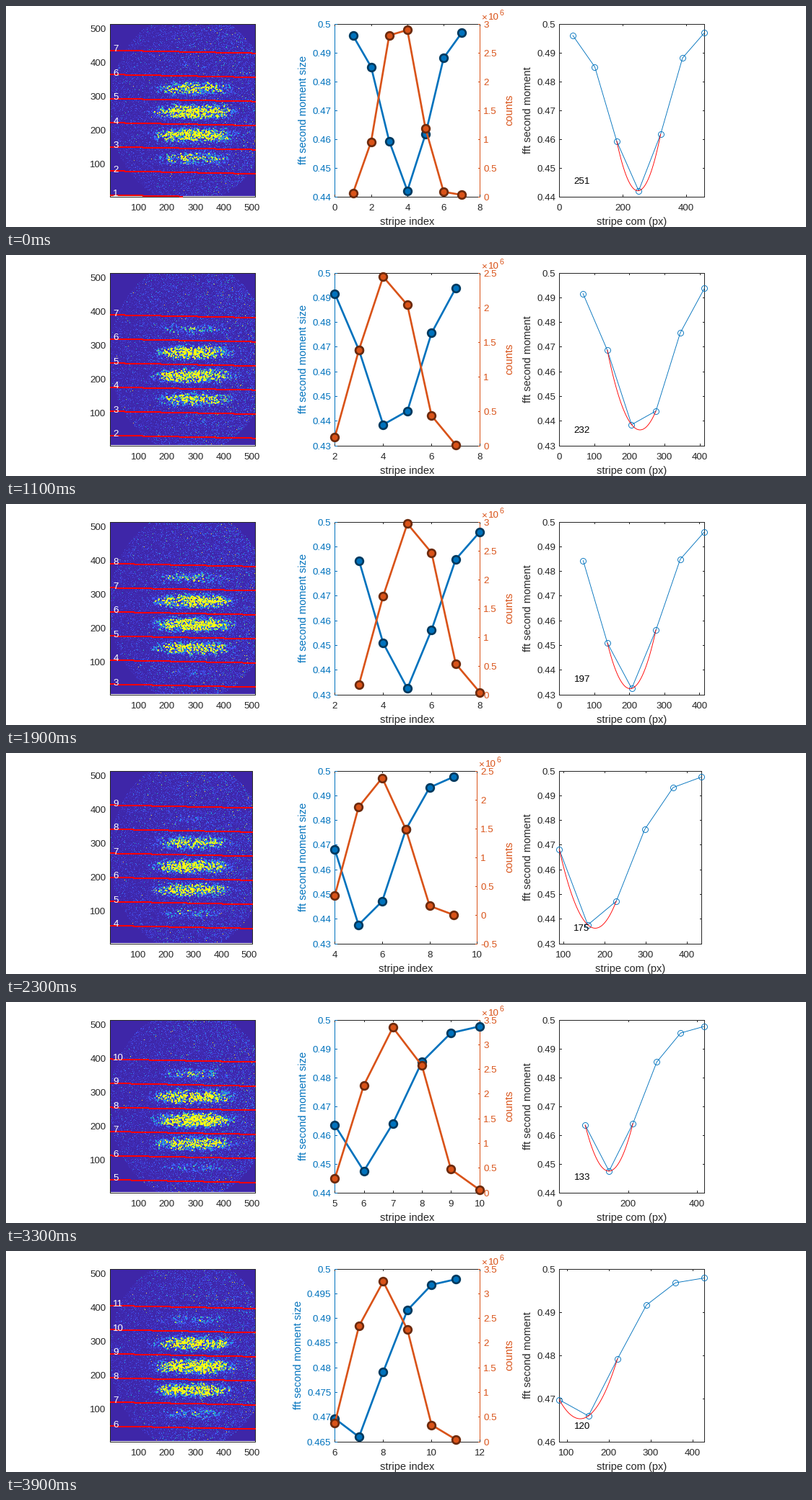
Animation, 1108 px wide and 307 px high, one loop 4.4 s. Source, as a matplotlib script:

```python
import numpy as np
import matplotlib.pyplot as plt
from matplotlib.animation import FuncAnimation
from matplotlib.colors import LinearSegmentedColormap

W, H, DPI = 1108, 307, 64
PT = 72 / DPI                      # points per pixel
TOP, BOTTOM = 24, 264
DARK, BLUE, ORANGE = "#262626", "#0072BD", "#D95319"
PITCH, ROW_SCALE = 33.5, 240 / 512
STRIPES = np.arange(1, 13)
PARULA = LinearSegmentedColormap.from_list("parula_like", [
    "#3E26A8", "#4746EB", "#3E6FFF", "#2797EB", "#0FB4CF",
    "#38C896", "#9FC941", "#FEC338", "#F9FB15"])

# Key points of the drift: height of line 1, centre and depth of the dip
STEPS = [0, 4, 8, 10, 13, 16, 18]
BASE = [262, 283.5, 316.75, 339.75, 364, 388.5, 410.25]
CENTRE = [251, 232, 197, 175, 136, 131, 120]
DIP = [.442, .435, .432, .436, .437, .452, .464]
# Brightness of the camera image at each step
EXPOSURE = [2.97, 3.7, 3.7, 3.7, 2.45, 3.7, 2.7, 3.7, 2.95, 3.7,
            2.38, 2.6, 2.9, 3.72, 3.3, 3.3, 3.75, 3.7, 3.2]

fig = plt.figure(figsize=(W / DPI, H / DPI), dpi=DPI, facecolor="white")
ax = fig.add_axes([0, 0, 1, 1])


def measure(step):
    """Position, moment and counts of the stripes in view at one step."""
    base, centre, dip = (np.interp(step, STEPS, v) for v in (BASE, CENTRE, DIP))
    middle = base - PITCH * (STRIPES - .5) + 1.75
    coms = 250 + .97 * ((BOTTOM - middle) / ROW_SCALE - 250)
    shown = (coms > 30) & (coms < 465)
    coms = coms[shown]

    offset = coms - centre
    spread = np.where(offset < 0, 115 - 1.5 * step, 105 + 1.5 * step)
    moments = .498 - (.498 - dip) * np.exp(-(offset / spread) ** 2)

    exposure = EXPOSURE[step]
    counts = exposure * np.exp(-np.abs((coms - 220) / 102) ** 2.75) + .05 * (exposure - 2.42)
    return STRIPES[shown], coms, moments, counts, base, centre


def text(x, y, s, color=DARK, size=13.33, ha="left", **kw):
    kw.setdefault("va", "baseline")
    ax.text(x, y, s, color=color, fontsize=size * PT, ha=ha,
            family="Liberation Sans", **kw)


def label(x, y, s, color=DARK, **kw):
    text(x, y, s, color, 14.67, "center", **kw)


def side_label(x, s, color=DARK):
    label(x, 144, s, color, va="center", rotation=90)


def line(x, y, color=DARK, width=1, **kw):
    ax.plot(x, y, color=color, lw=width * PT, **kw)


def scale(limits, start, end):
    lo, hi = limits
    return lambda v: start + (np.asarray(v) - lo) / (hi - lo) * (end - start)


def ticks(limits, step):
    lo, hi = limits
    return np.arange(np.ceil(lo / step - 1e-6), np.floor(hi / step + 1e-6) + 1) * step


def frame_box(left, right, left_color=DARK, right_color=DARK):
    for y in (TOP, BOTTOM):
        line([left, right], [y, y])
    line([left, left], [TOP, BOTTOM], left_color)
    line([right, right], [TOP, BOTTOM], right_color)


def x_ticks(values, to_x, marks=True):
    for v in values:
        x = float(to_x(v))
        text(x, 283.5, f"{v + 0:g}", ha="center")
        if marks:
            line([x, x], [BOTTOM, BOTTOM - 2.4])
            line([x, x], [TOP, TOP + 2.4])


def y_ticks(values, to_y, x, side, color=DARK, labels=True):
    for v in values:
        y = float(to_y(v))
        line([x, x - side * 2.4], [y, y], color)
        if labels:
            text(x + 5 * side, y + 5, f"{v + 0:g}", color, ha="left" if side > 0 else "right")


def moment_limits(lowest, step):
    return np.floor(lowest / step + 1e-6) * step, .5


def draw_camera(step, width, shown, coms, counts, base):
    left, right = 144, 144 + width
    rng = np.random.default_rng(100 + step)
    shape = (BOTTOM - TOP - 1, right - left - 1)
    y, x = np.mgrid[TOP + 1:BOTTOM, left + 1:right]
    u = (x - left) / width
    disc = np.hypot(u * 512 - 281, (BOTTOM - y) / ROW_SCALE - 262) < 285
    haze = .022 * rng.exponential(size=shape) ** 2 * (.5 + .8 * u)

    # Speckle with grains about two pixels wide
    grain = rng.gamma(.25, size=shape)
    grain = grain + np.roll(grain, 1, 0)
    grain = grain + np.roll(grain, 1, 1)
    bands = sum(max(count, 0) * np.exp(-.5 * ((y - BOTTOM + com * ROW_SCALE) / 4.8) ** 2)
                for com, count in zip(coms, counts))
    glow = .75 * bands * np.exp(-np.abs((u - .575) / .21) ** 3)
    image = disc * (haze + np.maximum(glow * grain - .12, 0))
    ax.imshow(image, cmap=PARULA, vmin=0, vmax=1, interpolation="nearest", aspect="auto",
              extent=(left + .6, right - .4, BOTTOM - .6, TOP + .4))
    frame_box(left, right)

    xs = np.linspace(left + 1, right, 100)
    for n in shown:
        y0 = base - PITCH * (n - 1)
        ys = y0 + 4 * (xs - left) / width
        inside = ys <= BOTTOM
        line(xs[inside], ys[inside], "red", antialiased=False)
        text(148, y0 + 1.5, str(n), "white")
    hundreds = np.arange(100, 501, 100)
    x_ticks(hundreds, scale((0, 512), left, right), marks=False)
    for v in hundreds:
        text(138, BOTTOM - v * ROW_SCALE + 6, f"{v}", ha="right")


def draw_stripes(width, shown, moments, counts, count_limits, count_step):
    left, right = 455, 455 + width
    first, last = shown[0], shown[-1]
    step = 1 if first % 5 == 0 and last % 5 == 0 else 2
    limits = (first // step * step, -(-last // step) * step)
    to_x = scale(limits, left, right)
    y_step = .005 if moments.min() > .465 else .01
    y_limits = moment_limits(moments.min(), y_step)
    to_moment, to_count = scale(y_limits, BOTTOM, TOP), scale(count_limits, BOTTOM, TOP)

    frame_box(left, right, BLUE, ORANGE)
    x_ticks(ticks(limits, step), to_x)
    y_ticks(ticks(y_limits, y_step), to_moment, left, -1, BLUE)
    y_ticks(ticks(count_limits, count_step), to_count, right, 1, ORANGE)
    for ys, color, edge in ((to_moment(moments), BLUE, "#00395E"),
                            (to_count(counts), ORANGE, "#6C2A0D")):
        line(to_x(shown), ys, color, 2.67, marker="o", ms=10.67 * PT,
             mec=edge, mew=2.67 * PT)
    text(right + 2, 18.5, "×", ORANGE)
    text(right + 11.5, 18.5, "10", ORANGE)
    text(right + 27, 12, "6", ORANGE, 10.67)
    side_label(405 if y_step < .01 else 412, "fft second moment size", BLUE)
    side_label(697, "counts", ORANGE)
    label((left + right) / 2, 303, "stripe index")


def draw_fit(width, coms, moments, centre):
    left, right = 766, 766 + width
    if width == 212:
        limits = (0, np.ceil((coms[-1] - 10) / 100) * 100)
    else:
        limits = (coms[0] if coms[0] > 80 else 0, coms[-1])
    to_x = scale(limits, left, right)
    low = min(max(int(np.argmin(moments)), 1), len(moments) - 2)
    near = slice(low - 1, low + 2)
    fit_x = np.linspace(coms[near][0], coms[near][-1], 80)
    fit_y = np.polyval(np.polyfit(coms[near] - 200, moments[near], 2), fit_x - 200)
    y_limits = moment_limits(min(fit_y.min(), moments.min()), .01)
    to_y = scale(y_limits, BOTTOM, TOP)

    frame_box(left, right)
    x_step = 200 if limits[1] - limits[0] > 420 and limits[1] % 100 else 100
    x_ticks(ticks(limits, x_step), to_x)
    rows = ticks(y_limits, .01)
    y_ticks(rows, to_y, left, -1)
    y_ticks(rows, to_y, right, 1, labels=False)
    line(to_x(coms), to_y(moments), BLUE, .9, marker="o", ms=8 * PT,
         mfc="none", mec=BLUE, mew=.9 * PT)
    line(to_x(fit_x), to_y(fit_y), "red", .9)
    text(left + .1 * width, 246, f"{centre:.0f}", "black")
    side_label(723, "fft second moment")
    label((left + right) / 2, 303, "stripe com (px)")


def draw(frame):
    # The first and last steps hold for five frames, the others for two
    step = int(np.clip((frame - 3) // 2, 0, 18))
    shown, coms, moments, counts, base, centre = measure(step)

    count_step = 1 if counts.max() > 3.5 else .5
    count_limits = (np.floor(counts.min() / count_step) * count_step,
                    np.ceil(counts.max() / count_step) * count_step)
    # Wider tick labels leave less room for the panels
    width = 197 if count_limits[0] < 0 else 212 if count_step == 1 else 201

    ax.clear()
    ax.axis("off")
    draw_camera(step, width, shown, coms, counts, base)
    draw_stripes(width, shown, moments, counts, count_limits, count_step)
    draw_fit(width, coms, moments, centre)
    # Slightly off the pixel centres, so that lines snap to the intended pixel
    ax.set_xlim(-.4, W - .4)
    ax.set_ylim(H - .6, -.6)
    return []


anim = FuncAnimation(fig, draw, frames=44, interval=100, init_func=lambda: [],
                     repeat=True, repeat_delay=0, blit=False)
plt.show()
```
